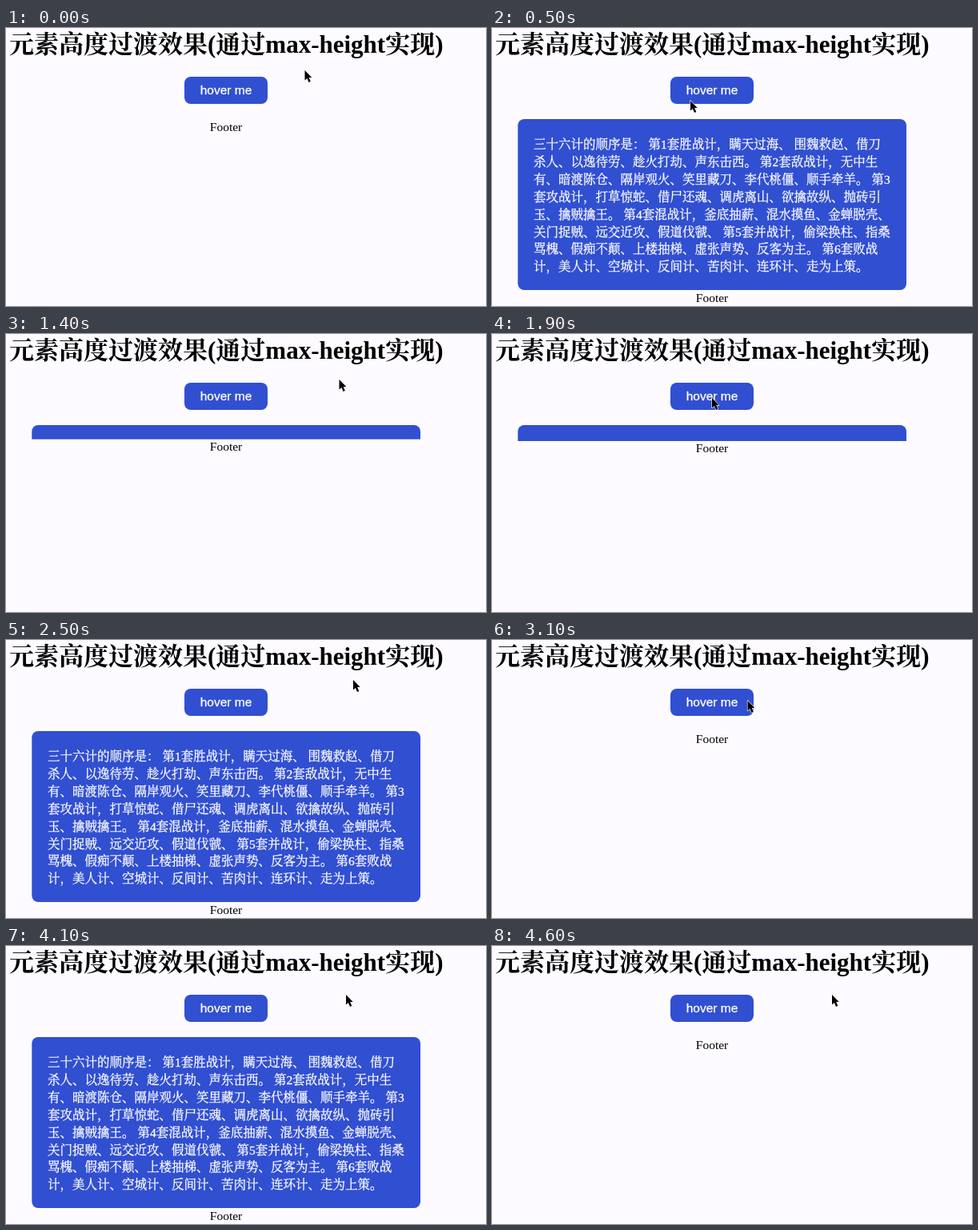
Write an HTML page that moves like this. It is 600x348 px and loops after 4.7 s.

```html
<!DOCTYPE html>
<html lang="zh-CN">
<head>
<meta charset="utf-8">
<title>max-height</title>
<style>
  html, body { margin: 0; width: 100%; height: 100%; overflow: hidden; background: #fdfbff; }
  svg { display: block; width: 600px; height: 348px; }
  text { font: 15.5px "Liberation Serif", "Noto Serif CJK SC", "Noto Sans CJK SC", "Noto Sans CJK", serif; }
  .title { font-size: 31px; font-weight: 600; }
  .button { font-family: "Liberation Sans", Arial, sans-serif; }
  .light { fill: #fff; stroke: #fff; stroke-width: .3; }
  .blue { fill: #314fd1; }
  .middle { text-anchor: middle; }
</style>
</head>
<body>
<svg viewBox="0 0 600 348">
  <defs><clipPath id="clip"><rect id="window" x="32" y="114" width="487" height="0"/></clipPath></defs>
  <rect width="600" height="348" fill="#fdfbff"/>
  <text class="title" x="4" y="30.5">元素高度过渡效果(通过max-height实现)</text>
  <rect class="blue" x="223" y="61" width="104" height="34" rx="8"/>
  <text class="button light middle" x="275" y="83">hover me</text>
  <g id="panel" clip-path="url(#clip)">
    <rect class="blue" x="32.3" y="114" width="485.7" height="214" rx="8"/>
  </g>
  <text id="footer" class="middle" x="275">Footer</text>
  <path id="cursor" d="M0 0V12.5L2.9 9.9L5 15L7.3 14L5.2 9.1H8.8Z"
        stroke="#fff" stroke-width="1.2" stroke-linejoin="round" paint-order="stroke"/>
</svg>
<script>
const LOOP = 4700, STEP = 100, DURATION = 500, GLIDE = 150;
const MAX_HEIGHT = 300, CONTENT_HEIGHT = 214;
const byId = id => document.getElementById(id);

const lines = [
  "三十六计的顺序是： 第1套胜战计，瞒天过海、 围魏救赵、借刀",
  "杀人、以逸待劳、趁火打劫、声东击西。 第2套敌战计，无中生",
  "有、暗渡陈仓、隔岸观火、笑里藏刀、李代桃僵、顺手牵羊。 第3",
  "套攻战计，打草惊蛇、借尸还魂、调虎离山、欲擒故纵、抛砖引",
  "玉、擒贼擒王。 第4套混战计，釜底抽薪、混水摸鱼、金蝉脱壳、",
  "关门捉贼、远交近攻、假道伐虢、 第5套并战计，偷梁换柱、指桑",
  "骂槐、假痴不颠、上楼抽梯、虚张声势、反客为主。 第6套败战",
  "计，美人计、空城计、反间计、苦肉计、连环计、走为上策。"
];
lines.forEach((line, i) => {
  const text = document.createElementNS("http://www.w3.org/2000/svg", "text");
  text.setAttribute("class", "light");
  text.setAttribute("x", 52);
  text.setAttribute("y", 151 + i * 21.9);
  text.textContent = line;
  byId("panel").append(text);
});

// The pointer alternately enters and leaves the button, resting at each stop
const start = { x: 373.5, y: 53 };
const stops = [
  { at: 170, x: 248, y: 91 },
  { at: 1050, x: 416.5, y: 57 },
  { at: 1860, x: 275, y: 80 },
  { at: 2450, x: 434, y: 50 },
  { at: 3100, x: 319.5, y: 76 },
  { at: 4072, x: 425, y: 61 }
];

// CSS "ease": cubic-bezier(.25, .1, .25, 1)
function ease(x) {
  if (x <= 0 || x >= 1) return x <= 0 ? 0 : 1;
  const bezier = (a, b, s) => 3 * a * s * (1 - s) ** 2 + 3 * b * s * s * (1 - s) + s ** 3;
  let low = 0, high = 1;
  for (let i = 0; i < 20; i++) {
    const mid = (low + high) / 2;
    if (bezier(0.25, 0.25, mid) < x) low = mid; else high = mid;
  }
  return bezier(0.1, 1, low);
}

function panelHeight(t) {
  const open = stops.reduce((sum, { at }, i) => {
    const progress = ease((t - at) / DURATION);
    return sum + (i % 2 ? -progress : progress);
  }, 0);
  return Math.min(CONTENT_HEIGHT, Math.max(0, MAX_HEIGHT * open));
}

function pointer(t) {
  return stops.reduce((from, to) => {
    const k = ease((t - to.at + GLIDE) / GLIDE);
    return { x: from.x + (to.x - from.x) * k, y: from.y + (to.y - from.y) * k };
  }, start);
}

function render(t) {
  const height = panelHeight(t);
  const { x, y } = pointer(t);
  byId("window").setAttribute("height", height);
  byId("footer").setAttribute("y", 128.5 + height);
  byId("cursor").setAttribute("transform", `translate(${x} ${y})`);
}

const began = performance.now();
function tick() {
  const t = Math.max(0, performance.now() - began) % LOOP;
  render(Math.floor(t / STEP) * STEP);
  requestAnimationFrame(tick);
}
tick();
</script>
</body>
</html>
```
